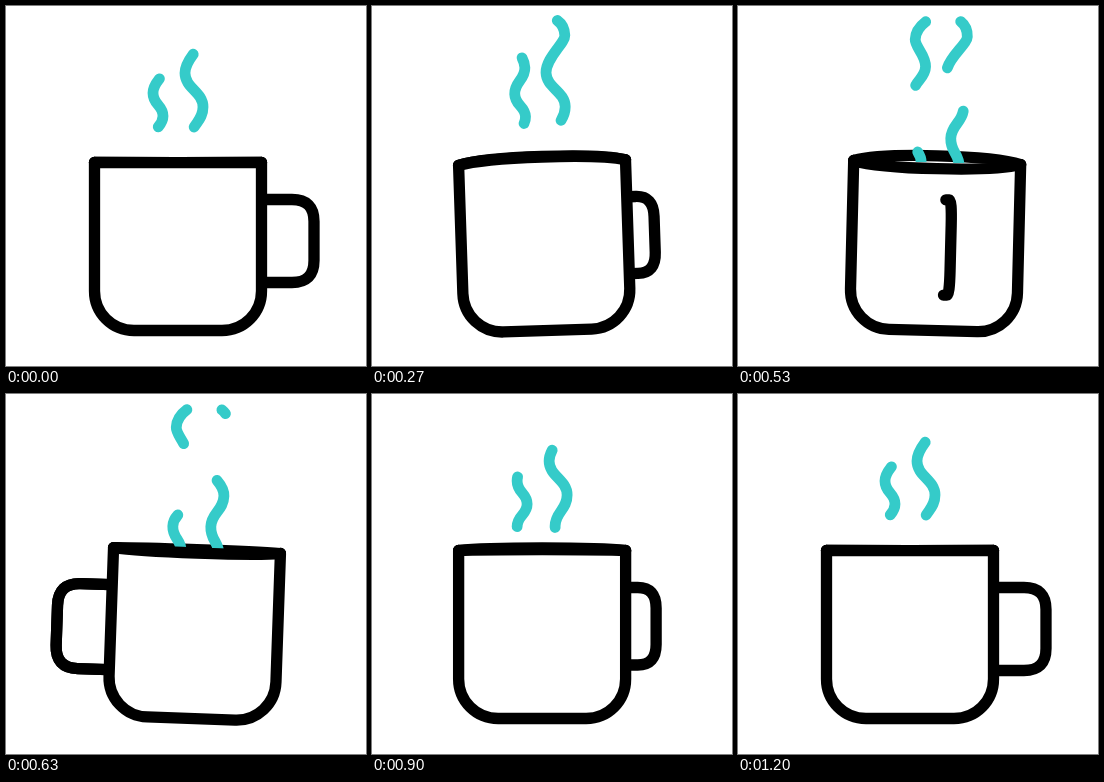
These frames come from a looping animation (360x360 px, 1670 ms). An HTML page without scripts:

```html
<!DOCTYPE html>
<html lang="en">
<head>
<meta charset="utf-8">
<title>Turning coffee cup</title>
<style>
@property --shift { syntax: "<length>"; inherits: true; initial-value: 0px; }
@property --lean { syntax: "<angle>"; inherits: true; initial-value: 0deg; }
@property --turn { syntax: "<angle>"; inherits: true; initial-value: 0deg; }
@property --front { syntax: "<number>"; inherits: true; initial-value: 0; }
@property --back { syntax: "<number>"; inherits: true; initial-value: 0; }
@property --head { syntax: "<number>"; inherits: true; initial-value: 0; }
@property --tail { syntax: "<number>"; inherits: true; initial-value: 0; }

html, body { margin: 0; width: 100%; height: 100%; overflow: hidden; background: #fff; }
svg { display: block; width: 100vw; height: 100vh; }
path {
  fill: none; stroke: #000; stroke-width: 11.3;
  stroke-linecap: round; stroke-linejoin: round;
}
.cup, .wisp { animation: 1.67s cubic-bezier(.37, 0, .63, 1) infinite; }
.cup {
  animation-name: shift, lean, turn, front, back;
  transform-origin: 172px 324.5px;
  transform: translate(var(--shift)) rotate(var(--lean));
}
.body, .front { fill: #fff; }

/* The small offset keeps a flat rim from collapsing to a zero scale. */
.rim { vector-effect: non-scaling-stroke; transform-origin: 172px 156.5px; }
.front { transform: scaleY(calc(var(--front) + .01)); }
.back { transform: scaleY(calc(var(--back) + .01)); }

/* The handle circles the cup and grows as it comes nearer. */
.handle {
  --near: calc(1 + .15 * sin(var(--turn)));
  vector-effect: non-scaling-stroke;
  transform-origin: 172px 193.5px;
  transform: scale(calc(cos(var(--turn)) * var(--near)), var(--near));
}
.facing { opacity: calc(1000 * sin(var(--turn))); }

/* Each wisp is one dash, from head to tail, on a fixed wave. */
.wave {
  stroke: #35cbc9; stroke-width: 10.8;
  stroke-dasharray: calc(1px * (var(--tail) - var(--head))) 400px;
  stroke-dashoffset: calc(-1px * var(--head));
  opacity: calc(var(--tail) - var(--head));
}
.tall { --top: 35; --end: 109; }
.short { --top: 58; --end: 107; }
.tall.out { animation-name: tall-head-out, tall-tail-out; }
.short.out { animation-name: short-head-out, short-tail-out; }
.tall.in { animation-name: tall-head-in, tail-in; }
.short.in { animation-name: short-head-in, tail-in; }
.out { animation-timing-function: cubic-bezier(.33, 0, .67, .33), cubic-bezier(.33, 0, .67, 0); }
.in { animation-timing-function: cubic-bezier(.33, .85, .67, 1); }

@keyframes shift {
  10.2% { --shift: -4px; }
  27%, 31.7% { --shift: 23px; }
  47.3% { --shift: -7px; }
  57.5%, 100% { --shift: 0px; }
}
@keyframes lean {
  14% { --lean: -2deg; }
  37.7% { --lean: 2deg; }
  46.1% { --lean: -1.3deg; }
  54%, 100% { --lean: 0deg; }
}
@keyframes turn {
  0%, 1.8% { --turn: 0deg; }
  11.4% { --turn: -34deg; animation-timing-function: cubic-bezier(.48, 0, .45, 1); }
  66%, 100% { --turn: 360deg; }
}
@keyframes front {
  15% { --front: -.6; }
  26%, 32% { --front: .6; }
  46% { --front: -.4; }
  58%, 100% { --front: 0; }
}
@keyframes back {
  15% { --back: -.6; }
  26% { --back: -1.2; }
  38% { --back: -.1; }
  50% { --back: -.35; }
  62%, 100% { --back: 0; }
}
@keyframes tall-head-out {
  0%, 1.8% { --head: var(--top); }
  16.2%, 100% { --head: 0; }
}
@keyframes tall-tail-out {
  0%, 1.8% { --tail: var(--end); }
  38.3%, 100% { --tail: 0; }
}
@keyframes short-head-out {
  0%, 1.8% { --head: var(--top); }
  25.7%, 100% { --head: 0; }
}
@keyframes short-tail-out {
  0%, 1.8% { --tail: var(--end); }
  43%, 100% { --tail: 0; }
}
@keyframes tall-head-in {
  0%, 18% { --head: 155; }
  72%, 100% { --head: var(--top); }
}
@keyframes short-head-in {
  0%, 27.5% { --head: 155; }
  72%, 100% { --head: var(--top); }
}
@keyframes tail-in {
  0%, 42% { --tail: 155; }
  70%, 100% { --tail: var(--end); }
}
</style>
</head>
<body>
<svg viewBox="0 0 360 360">
  <defs>
    <path id="handle" class="handle" d="M256 193.5H286Q308 193.5 308 215.5V254.5Q308 276.5 286 276.5H256"/>
    <path id="rim" class="rim" d="M88.5 156.5C118 170 226 170 255.5 156.5"/>
    <path id="tall" class="wave" pathLength="155" d="M192 15C196 18 199 22 199 30S179 52 179 67S197 86 197 101S185 118 185 132S194 147 194 160V170"/>
    <path id="short" class="wave" pathLength="155" d="M157 16C152 20 147 26 147 34S158 49 158 61S147 75 147 87S157 99 157 110S147 121 147 133S156 146 156 157V170"/>
  </defs>
  <g class="cup">
    <use href="#handle"/>
    <path class="rim back" d="M88.5 156.5C118 170 226 170 255.5 156.5"/>
    <use class="wisp tall out" href="#tall"/>
    <use class="wisp tall in" href="#tall"/>
    <use class="wisp short out" href="#short"/>
    <use class="wisp short in" href="#short"/>
    <path class="body" d="M88.5 156.5V285C88.5 307 106 324.5 128 324.5H216C238 324.5 255.5 307 255.5 285V156.5"/>
    <path class="rim front" d="M88.5 156.5C118 170 226 170 255.5 156.5"/>
    <use class="facing" href="#handle"/>
  </g>
</svg>
</body>
</html>
```
